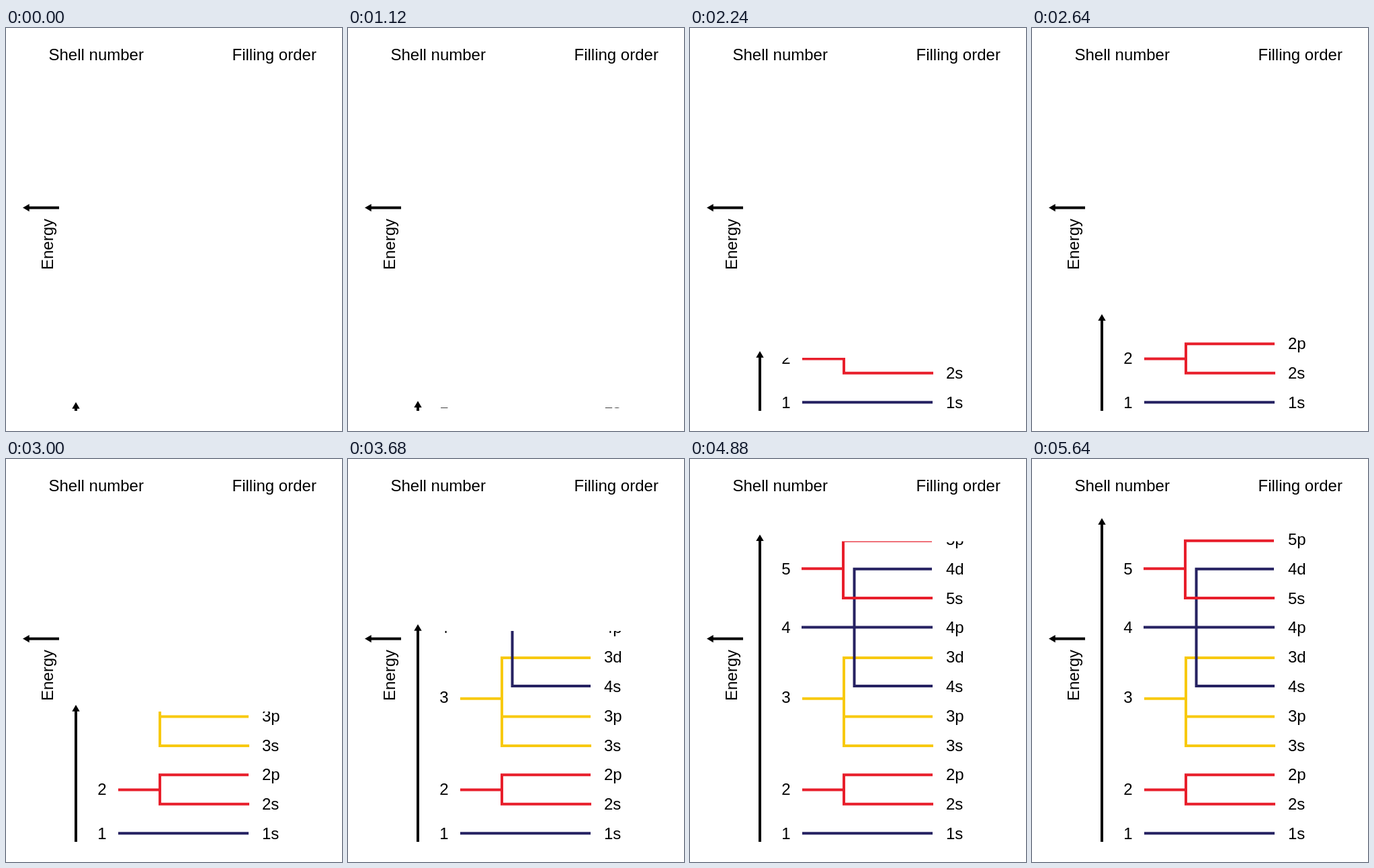
These frames come from a looping animation (500 by 600 pixels, 7800 ms). An HTML page with a canvas:

```html
<!DOCTYPE html>
<html lang="en">
<head>
<meta charset="utf-8">
<title>Shell filling order</title>
<style>
html, body { margin: 0; width: 100%; height: 100%; overflow: hidden; background: #fff; }
canvas { display: block; }
</style>
</head>
<body>
<canvas id="stage" width="500" height="600"></canvas>
<script>
const ctx = document.getElementById('stage').getContext('2d');
const LOOP = 7800, START = 920, STEP = 40;
const NAVY = '#262262', RED = '#e81e2b', YELLOW = '#f8c90e';

// Arrow tip height at a few steps of the rise
const keys = [[0, 557], [20, 529], [33, 481], [40, 444], [52, 366], [60, 308],
  [69, 246], [80, 182], [84, 163], [100, 110], [118, 88]];
const last = keys.length - 1;

function slope(i) {
  if (i === 0 || i === last) return 0;
  const [a, b, c] = [keys[i - 1], keys[i], keys[i + 1]];
  const h = b[0] - a[0], k = c[0] - b[0];
  return ((b[1] - a[1]) / h * k + (c[1] - b[1]) / k * h) / (h + k);
}

function tipAt(n) {
  let i = 0;
  while (i < last - 1 && n > keys[i + 1][0]) i++;
  const [x0, y0] = keys[i], [x1, y1] = keys[i + 1];
  const h = x1 - x0, u = (n - x0) / h, v = 1 - u;
  return v * v * (1 + 2 * u) * y0 + u * u * (1 + 2 * v) * y1 +
    h * u * v * (v * slope(i) - u * slope(i + 1));
}

const shells = [
  { n: 1, y: 557.3, base: 566 },
  { n: 2, y: 492.4, base: 500 },
  { n: 3, y: 356.7, base: 363 },
  { n: 4, y: 250.6, base: 259 },
  { n: 5, y: 163.2, base: 172 }
];

const orbitals = [['1s', 566], ['2s', 522], ['2p', 478], ['3s', 435], ['3p', 391], ['4s', 347],
  ['3d', 303], ['4p', 259], ['5s', 216], ['4d', 172], ['5p', 128]];

function line(color, ...pts) {
  ctx.strokeStyle = color;
  ctx.beginPath();
  pts.forEach(([x, y]) => ctx.lineTo(x, y));
  ctx.stroke();
}

function text(s, x, y) {
  ctx.fillStyle = '#000';
  ctx.fillText(s, x, y);
}

// Arrow pointing up from the local origin
function arrow(x, y, length, angle) {
  ctx.save();
  ctx.translate(x, y);
  ctx.rotate(angle);
  ctx.fillStyle = '#000';
  ctx.beginPath();
  ctx.moveTo(0, 0);
  ctx.lineTo(5.7, 9.7);
  ctx.lineTo(-5.7, 9.7);
  ctx.fill();
  ctx.fillRect(-2, 8, 4, length - 8);
  ctx.restore();
}

function diagram() {
  const [s1, s2, s3, s4, s5] = shells.map(s => s.y);
  line(NAVY, [167, s1], [361, s1]);
  line(RED, [167, s2], [229, s2]);
  line(RED, [361, 470.2], [229, 470.2], [229, 513.8], [362, 513.8]);
  line(YELLOW, [167, s3], [229, s3]);
  line(YELLOW, [361, 296], [229, 296], [229, 427], [362, 427]);
  line(YELLOW, [229, 383.4], [361, 383.4]);
  line(NAVY, [166, s4], [361, s4]);
  line(NAVY, [360, 163.8], [244.5, 163.8], [244.5, 338], [361, 338]);
  line(RED, [166, s5], [228, s5]);
  line(RED, [360, 121.8], [228, 121.8], [228, 207], [361, 207]);
  shells.forEach(s => text(s.n, 136.3, s.base));
  orbitals.forEach(([name, y]) => text(name, 381, y));
}

function draw(time) {
  const n = Math.max(0, Math.min(118, Math.floor((time % LOOP - START) / STEP)));
  const tip = tipAt(n);
  ctx.fillStyle = '#fff';
  ctx.fillRect(0, 0, 500, 600);
  ctx.font = '24px "Liberation Sans", Arial, sans-serif';
  ctx.lineWidth = 4;
  text('Shell number', 63.5, 48);
  text('Filling order', 336.5, 48);
  arrow(25, 267.6, 54, -Math.PI / 2);
  ctx.save();
  ctx.translate(69.5, 360);
  ctx.rotate(-Math.PI / 2);
  text('Energy', 0, 0);
  ctx.restore();

  ctx.save();
  ctx.beginPath();
  ctx.rect(120, tip + 10, 380, 600);
  ctx.clip();
  diagram();
  ctx.restore();
  arrow(104, tip, 570 - tip, 0);
}

const begin = performance.now();
function frame() {
  draw(performance.now() - begin);
  requestAnimationFrame(frame);
}
frame();
</script>
</body>
</html>
```
